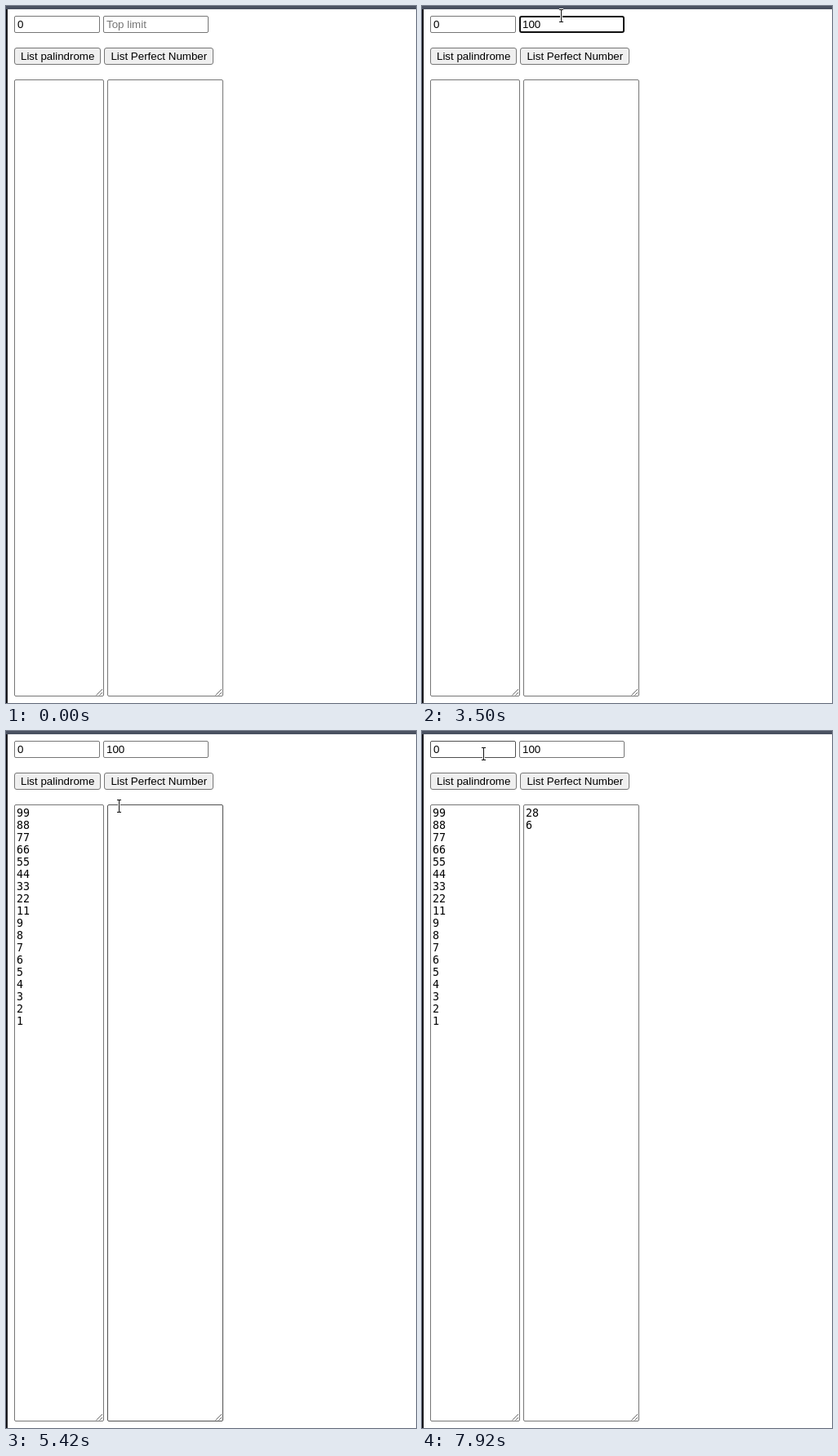
Write an HTML page that moves like this. It is 502 by 854 pixels and loops after 8 s.

```html
<!DOCTYPE html>
<html lang="en">
<head>
<meta charset="utf-8">
<title>Number lists</title>
<style>
html, body { margin: 0; width: 100%; height: 100%; overflow: hidden; background: #fff; }
div, svg { position: absolute; box-sizing: border-box; }
#top { left: 0; top: 0; width: 100%; height: 4px; background: #4a5161; }
#side { left: 0; top: 4px; width: 2px; bottom: 0; background: #17171b; }
.field, .button, .area {
  border: 1px solid #767676; border-radius: 2px; white-space: pre; color: #000;
  font: 13.3333px/15px "Liberation Sans", Arial, sans-serif;
}
.field { top: 12px; height: 21px; padding: 2px 3px; }
.button { top: 51px; height: 21px; padding: 2px 7px; border-radius: 3px; background: #efefef; }
.area { top: 90px; height: 756px; padding: 2px; font-family: "DejaVu Sans Mono", monospace; }
.area svg { right: 0; bottom: 0; }
.hover { border-color: #4f4f4f; }
.button.hover { background: #e5e5e5; }
.button.press { background: #f5f5f5; border-color: #8d8d8d; }
.focus { border: 2px solid #101010; border-radius: 3px; padding: 1px 2px; }
.empty { color: #757575; }
#caret { top: 15px; width: 1px; height: 15px; background: #000; }
#cursor { left: 0; top: 0; overflow: visible; }
</style>
</head>
<body>
<div id="top"></div>
<div id="side"></div>
<div id="low" class="field" style="left:10px;width:105px">0</div>
<div id="high" class="field" style="left:119px;width:129px"></div>
<div id="palBtn" class="button" style="left:10px">List palindrome</div>
<div id="perfBtn" class="button" style="left:120.4px">List Perfect Number</div>
<div id="pal" class="area" style="left:10px;width:110px"><span></span></div>
<div id="perf" class="area" style="left:124px;width:142px"><span></span></div>
<div id="caret"></div>
<svg id="cursor" width="1" height="1">
  <path id="arrow" d="M.5 1.5V14.5L3.6 11.8L6 17.2L8.2 16.2L5.9 11H10Z" fill="#111" stroke="#fff" stroke-width="2" paint-order="stroke"/>
  <g id="beam" fill="none">
    <path d="M-2 -7.5H3M-2 7.5H3M.5 -7.5V7.5" stroke="#fff" stroke-width="3"/>
    <path d="M-2 -7.5H3M-2 7.5H3M.5 -7.5V7.5" stroke="#111"/>
  </g>
</svg>
<script>
const $ = id => document.getElementById(id);
const LOOP = 8000, FPS = 12, TICKS = LOOP / 1000 * FPS;

// Pointer stops: tick, x, y; the pointer eases from each to the next.
const stops = [
  [5, 500, 345], [12, 161, 51], [17, 170, 12],
  [42, 170, 12], [46, 92, 78], [49, 82, 62],
  [58, 82, 62], [62, 85, 126], [68, 190, 57],
  [86, 190, 57], [95, 75, 28]
];
const FOCUS = 18, TYPE = 31, PRESS_PAL = 51, LIST_PAL = 52, PRESS_PERF = 72, LIST_PERF = 74;

const numbers = Array.from({ length: 99 }, (_, i) => 99 - i);
const isPalindrome = n => String(n) === [...String(n)].reverse().join("");
const isPerfect = n => numbers.reduce((sum, d) => d < n && n % d === 0 ? sum + d : sum, 0) === n;
const palindromes = numbers.filter(isPalindrome).join("\n");
const perfects = numbers.filter(isPerfect).join("\n");

const controls = document.querySelectorAll(".field, .button, .area");
for (const area of document.querySelectorAll(".area"))
  area.insertAdjacentHTML("beforeend",
    '<svg width="9" height="9"><path d="M.5 8.5L8 1M4.5 8.5L8 5" stroke="#6a6a6a" fill="none"/></svg>');

const within = (k, from, to) => k >= from && k < to;
const clamp = (v, lo, hi) => Math.min(hi, Math.max(lo, v));
const ease = u => u * u * (3 - 2 * u);
const show = (el, on) => { el.style.display = on ? "" : "none"; };

function pointer(k) {
  const next = stops.findIndex(s => s[0] >= k);
  if (next < 1) return null;
  const [t0, x0, y0] = stops[next - 1], [t1, x1, y1] = stops[next];
  const u = ease((k - t0) / (t1 - t0));
  return [Math.round(x0 + (x1 - x0) * u), Math.round(y0 + (y1 - y0) * u)];
}

function hit(el, [x, y]) {
  const { offsetLeft: l, offsetTop: t, offsetWidth: w, offsetHeight: h } = el;
  return x >= l && x < l + w && y >= t && y < t + h;
}

function drawField(k) {
  // One digit every two ticks; each keystroke restarts the caret blink.
  const count = clamp(Math.floor((k - TYPE) / 2) + 1, 0, 3);
  const lastInput = count ? TYPE + 2 * (count - 1) : FOCUS;
  const focused = within(k, FOCUS, PRESS_PAL);
  $("high").textContent = count ? "100".slice(0, count) : "Top limit";
  $("high").classList.toggle("empty", !count);
  $("high").classList.toggle("focus", focused);
  $("caret").style.left = 123 + Math.round(count * 7.415) + "px";
  show($("caret"), focused && (k - lastInput) % 14 < 7);
}

function drawPointer(k) {
  const pos = pointer(k);
  let over = null;
  for (const el of controls) {
    const on = !!pos && hit(el, pos);
    el.classList.toggle("hover", on);
    if (on) over = el;
  }
  show($("cursor"), pos);
  if (pos) $("cursor").style.transform = `translate(${pos[0]}px, ${pos[1]}px)`;
  const text = over && !over.classList.contains("button");
  show($("beam"), text);
  show($("arrow"), !text);
}

function draw(k) {
  drawField(k);
  drawPointer(k);
  $("palBtn").classList.toggle("press", within(k, PRESS_PAL, LIST_PAL));
  $("perfBtn").classList.toggle("press", within(k, PRESS_PERF, LIST_PERF));
  $("pal").firstChild.textContent = k >= LIST_PAL ? palindromes : "";
  $("perf").firstChild.textContent = k >= LIST_PERF ? perfects : "";
}

function frame() {
  // The small offset absorbs rounding at tick boundaries.
  draw(Math.floor((performance.now() % LOOP + 4) * FPS / 1000) % TICKS);
  requestAnimationFrame(frame);
}
frame();
</script>
</body>
</html>
```
